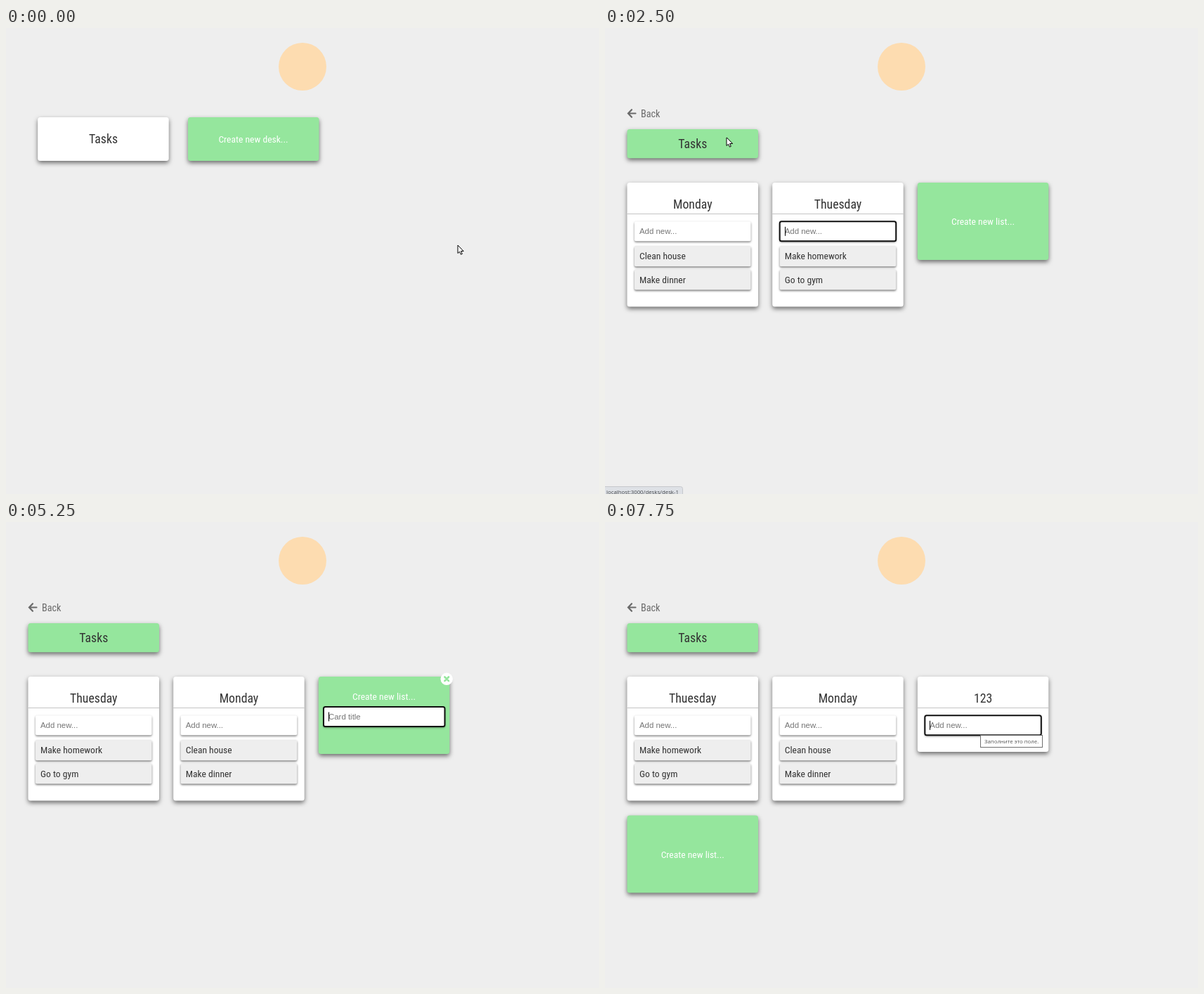
An HTML page with a canvas for the animation above (8 s loop, 844 px wide and 663 px high).

```html
<!DOCTYPE html>
<html lang="en">
<head>
<meta charset="utf-8">
<title>Task desk</title>
<style>
  html, body { margin: 0; width: 100%; height: 100%; overflow: hidden; background: #eee; }
  canvas { display: block; }
</style>
</head>
<body>
<canvas id="stage" width="844" height="663"></canvas>
<script>
const ctx = document.getElementById('stage').getContext('2d');
const LOOP = 8000, STEP = 250;
const GREEN = '#95e69d', INK = '#333', HINT = '#757575';
const CONDENSED = '"Roboto Condensed", Roboto, sans-serif';
const ARIAL = '"Liberation Sans", Arial, sans-serif';
const SYSTEM = '"Open Sans", "Noto Sans", sans-serif';
const COLUMNS = [31.5, 238.2, 444.8], CARD_W = 186.5, LIST_Y = 220;
const LISTS = {
  monday: { title: 'Monday', items: ['Clean house', 'Make dinner'], height: 176.5 },
  thuesday: { title: 'Thuesday', items: ['Make homework', 'Go to gym'], height: 176.5 },
  numbers: { title: '123', items: [], height: 107 }
};

// Each entry holds from its time on: [ms, x, y, shape]
const CURSOR = [
  [0, 643, 309, 'arrow'], [250, 237, 230, 'arrow'], [500, 190, 165, 'hand'],
  [1250, 275, 165, 'hand'], [1500, 181, 164, 'hand'], [2500, 173, 156, 'arrow'],
  [3000, 165, 235, 'hand'], [3250, 164, 268, 'hand'], [3500, 139, 261, 'hand'],
  [4000, 313, 260, 'fist'], [4250, 434, 260, 'fist'], [4750, 441, 260, 'fist'],
  [5000, 540, 275, 'hand'], [5250, 0, 0, 'none'], [6500, 551.5, 272, 'arrow'],
  [6750, 0, 0, 'none']
];
const DRAG_X = [[4000, 127.2], [4250, 248], [4750, 255]];
const TYPED = [[5250, ''], [5750, '1'], [6000, '123']];

const at = (track, t) => track.filter(k => k[0] <= t).pop();
const within = (t, from, to) => t >= from && t < to;

function text(str, x, y, { size = 13.6, color = INK, align = 'left', family = CONDENSED, weight = 400 } = {}) {
  const narrow = family === CONDENSED;
  ctx.font = `${weight} ${narrow ? 'condensed ' : ''}${size}px ${family}`;
  ctx.fontStretch = narrow ? 'condensed' : 'normal';
  ctx.fillStyle = color;
  ctx.textAlign = align;
  ctx.fillText(str, x, y);
}

function box(x, y, w, h, fill, r = 3.5, blur = 6, drop = 3, alpha = 0.55) {
  ctx.save();
  ctx.shadowColor = `rgba(0,0,0,${alpha})`;
  ctx.shadowBlur = blur;
  ctx.shadowOffsetY = drop;
  ctx.fillStyle = fill;
  ctx.beginPath();
  ctx.roundRect(x, y, w, h, r);
  ctx.fill();
  ctx.restore();
}

function scaled(cx, cy, on, draw) {
  ctx.save();
  if (on) {
    ctx.translate(cx, cy);
    ctx.scale(1.05, 1.05);
    ctx.translate(-cx, -cy);
  }
  draw();
  ctx.restore();
}

function input(x, y, w, hint, { focus = false, caret = false, value = '' } = {}) {
  box(x, y, w, 28, '#fff', 2, 3, 1.5, 0.5);
  if (focus) {
    ctx.strokeStyle = '#101010';
    ctx.lineWidth = 2;
    ctx.beginPath();
    ctx.roundRect(x, y, w, 28, 2.5);
    ctx.stroke();
  }
  text(value || hint, x + 7, y + 17.5, { size: 11.43, color: value ? '#000' : HINT, family: ARIAL });
  if (caret) {
    ctx.fillStyle = '#000';
    ctx.fillRect(Math.round(x + 7 + (value ? ctx.measureText(value).width : 0)), y + 7.5, 1, 13);
  }
}

function list({ title, items, height }, x, y, state) {
  box(x, y, CARD_W, height, '#fff');
  text(title, x + CARD_W / 2, y + 37, { size: 17.8, align: 'center' });
  ctx.fillStyle = '#c4c4c4';
  ctx.fillRect(x, y + 44, CARD_W, 1);
  input(x + 10.5, y + 55.3, 165.5, 'Add new...', state);
  items.forEach((item, i) => {
    const top = y + 90.3 + i * 33.2;
    box(x + 10.5, top, 165.5, 29, '#eee', 2, 3, 1.5, 0.55);
    text(item, x + 17.5, top + 19);
  });
}

function createList(x, y, hover) {
  scaled(x + CARD_W / 2, y + 55, hover, () => {
    box(x, y, CARD_W, 110, GREEN);
    text('Create new list...', x + CARD_W / 2, y + 60, { color: '#fff', align: 'center' });
  });
}

function createForm(x, y, value) {
  box(x, y, CARD_W, 110, GREEN);
  text('Create new list...', x + CARD_W / 2, y + 33, { color: '#fff', align: 'center' });
  input(x + 7.2, y + 43, 172.5, 'Card title', { focus: true, caret: true, value });
  const cx = x + 182.4, cy = y + 3.3;
  ctx.fillStyle = '#fff';
  ctx.beginPath();
  ctx.arc(cx, cy, 8.7, 0, Math.PI * 2);
  ctx.fill();
  ctx.strokeStyle = GREEN;
  ctx.lineWidth = 2.6;
  ctx.lineCap = 'round';
  ctx.beginPath();
  for (const s of [-1, 1]) {
    ctx.moveTo(cx - 2.8, cy - 2.8 * s);
    ctx.lineTo(cx + 2.8, cy + 2.8 * s);
  }
  ctx.stroke();
}

function logo() {
  ctx.fillStyle = '#fddcb0';
  ctx.beginPath();
  ctx.arc(422, 55, 34, 0, Math.PI * 2);
  ctx.fill();
}

function backLink() {
  ctx.strokeStyle = '#6a6a6a';
  ctx.lineWidth = 2.2;
  ctx.lineCap = 'round';
  ctx.lineJoin = 'miter';
  ctx.beginPath();
  ctx.moveTo(38, 116.2);
  ctx.lineTo(33, 121.5);
  ctx.lineTo(38, 126.8);
  ctx.moveTo(33.5, 121.5);
  ctx.lineTo(43.5, 121.5);
  ctx.stroke();
  text('Back', 51, 126.8, { size: 14.2, color: '#6a6a6a' });
}

function statusBar() {
  ctx.fillStyle = '#dee1e6';
  ctx.strokeStyle = '#c6c8cc';
  ctx.lineWidth = 1;
  ctx.beginPath();
  ctx.roundRect(-5.5, 652.5, 116, 20, 3);
  ctx.fill();
  ctx.stroke();
  text('localhost:3000/desks/desk-1', 2, 662.6, { size: 7.8, color: '#44474b', family: SYSTEM });
}

function tooltip() {
  ctx.fillStyle = '#fff';
  ctx.fillRect(534, 303, 89, 18);
  ctx.strokeStyle = '#6f6f6f';
  ctx.lineWidth = 1;
  ctx.strokeRect(534.5, 303.5, 88, 17);
  text('Заполните это поле.', 540, 314.6, { size: 7.8, color: '#555', family: SYSTEM });
}

function arrow() {
  const points = [[0, 0], [0, 11.5], [2.6, 9.2], [4.4, 13.2], [6.3, 12.4], [4.6, 8.5], [8.2, 8.5]];
  ctx.beginPath();
  points.forEach(p => ctx.lineTo(...p));
  ctx.closePath();
  ctx.fillStyle = '#fff';
  ctx.strokeStyle = '#000';
  ctx.lineWidth = 1;
  ctx.lineJoin = 'round';
  ctx.fill();
  ctx.stroke();
}

function hand(reach) {
  ctx.lineCap = 'round';
  const stroke = (color, width, [tx, ty], [bx, by]) => {
    ctx.strokeStyle = color;
    ctx.lineWidth = width;
    ctx.beginPath();
    ctx.moveTo(bx, by);
    ctx.lineTo(tx, ty);
    ctx.stroke();
  };
  const palm = (color, grow) => {
    ctx.fillStyle = color;
    ctx.beginPath();
    ctx.ellipse(0.4, 2, 3.6 + grow, 3.4 + grow, 0, 0, Math.PI * 2);
    ctx.fill();
  };
  palm('#111', 1);
  const tips = [[-4.4, 0.8], [-2.6, -3.4 * reach], [-0.2, -4.6 * reach], [2.2, -3.9 * reach], [4.4, -2 * reach]];
  tips.forEach(tip => {
    const base = [tip[0] * 0.6, 2];
    stroke('#111', 3.3, tip, base);
    stroke('#fff', 1.6, tip, base);
  });
  palm('#fff', 0);
}

function cursor(t) {
  const [, x, y, shape] = at(CURSOR, t);
  if (shape === 'none') return;
  ctx.save();
  ctx.translate(x, y);
  if (shape === 'arrow') arrow();
  else hand(shape === 'hand' ? 1 : 0.65);
  ctx.restore();
}

function desksPage(t) {
  const overNew = within(t, 1250, 1500);
  scaled(138.5, 158, t >= 500 && !overNew, () => {
    box(45.2, 127, CARD_W, 62, '#fff');
    text('Tasks', 138.5, 164, { size: 17.8, align: 'center' });
  });
  scaled(352, 158, overNew, () => {
    box(259, 127, CARD_W, 62, GREEN);
    text('Create new desk...', 352, 162.8, { color: '#fff', align: 'center' });
  });
}

function deskPage(t) {
  backLink();
  box(31.5, 144, CARD_W, 41.3, GREEN);
  text('Tasks', 124.8, 171, { size: 17.8, align: 'center' });

  const [first, second, third] = COLUMNS;
  const swapped = t >= 4250, dragging = within(t, 4000, 5000);
  const caret = !within(t, 3000, 3750) && !within(t, 4250, 4750);
  list(LISTS.thuesday, swapped ? first : second, LIST_Y, { focus: t < 5250, caret: t < 5250 && caret });

  if (t < 5250) createList(third, LIST_Y, t >= 5000);
  else if (t < 6500) createForm(third, LIST_Y, at(TYPED, t)[1]);
  else {
    list(LISTS.numbers, third, LIST_Y, { focus: true, caret: !within(t, 7250, 7750) });
    createList(first, 417.5, false);
  }

  const x = dragging ? at(DRAG_X, t)[1] : swapped ? second : first;
  list(LISTS.monday, x, LIST_Y - (dragging ? 0.8 : 0));
  if (t >= 7500) tooltip();
}

function render(t) {
  ctx.fillStyle = '#eee';
  ctx.fillRect(0, 0, 844, 663);
  logo();
  if (t < 2500) desksPage(t);
  else deskPage(t);
  if (within(t, 750, 3000)) statusBar();
  cursor(t);
}

const start = performance.now();
function tick() {
  const t = (performance.now() - start) % LOOP;
  render(Math.floor(t / STEP) * STEP);
  requestAnimationFrame(tick);
}
tick();
</script>
</body>
</html>
```
